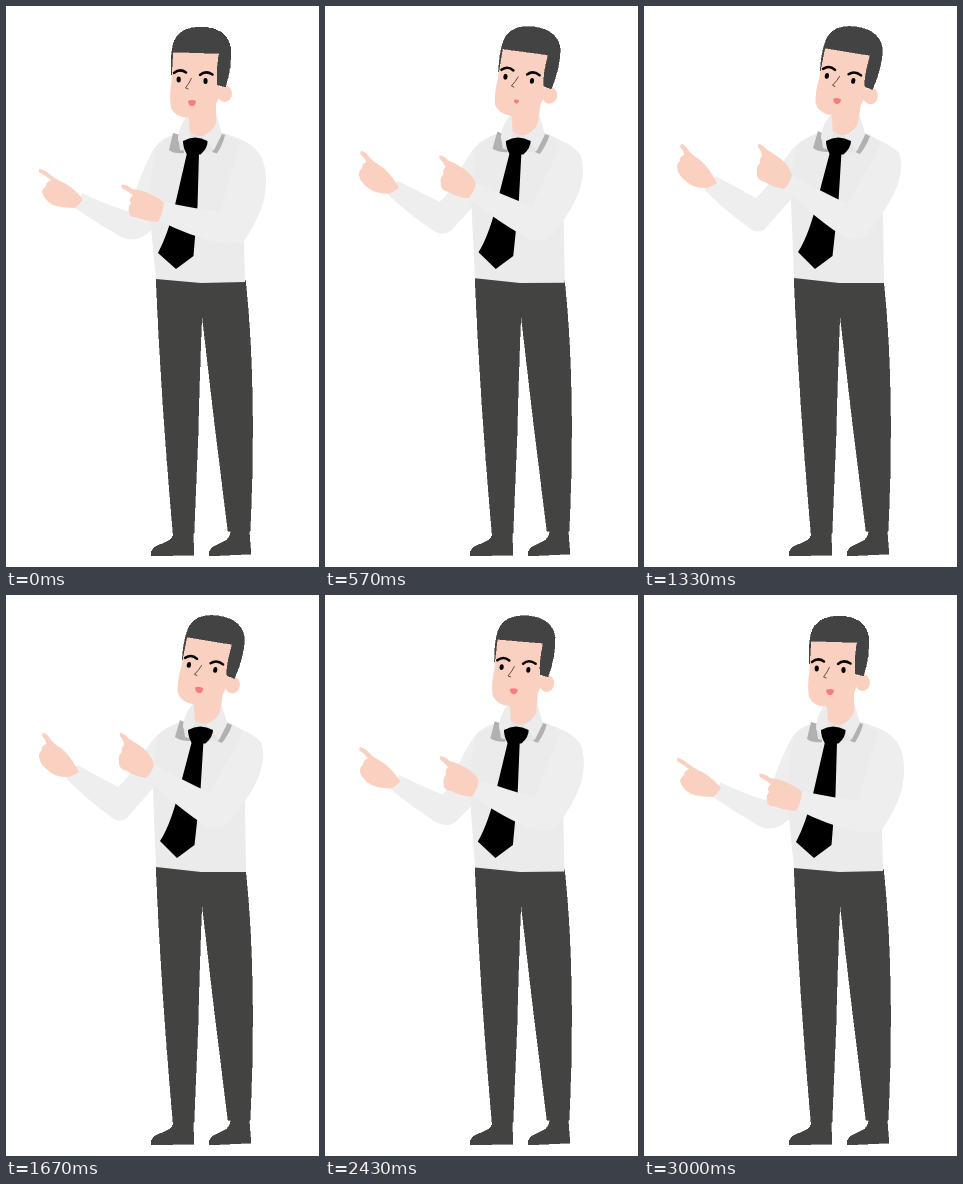
An HTML page that plays this animation: 313 by 561 pixels, repeating every 3030 ms.

```html
<!DOCTYPE html>
<html lang="en">
<head>
<meta charset="utf-8">
<title>Pointing man</title>
<style>
  html, body { margin: 0; width: 100%; height: 100%; overflow: hidden; background: #fff; }
  svg { display: block; width: 100vw; height: 100vh; }
  .crisp { shape-rendering: crispEdges; stroke-width: .6; }
</style>
</head>
<body>
<svg viewBox="0 0 313 561">
  <g class="crisp" fill="#434341" stroke="#434341">
    <path d="M150 271 L239.500 275 Q246 335 246.500 410 Q247 470 244 525 L222 525 Q208 415 196 308 Q194 350 192 430 L188 527 L167 527 Q155 390 150 271Z"/>
    <path d="M168 524 H187 L188 549 L145 550 Q144 545 149 541 L160 536 Q167 534 168 524Z"/>
    <path d="M225 523 H243 L245 548 L203 550 Q202 545 207 541 L217 536 Q225 533 225 523Z"/>
  </g>

  <path id="farArm" fill="#eee"/>
  <path id="farHand" fill="#fad1c1"/>
  <path id="torso" fill="#ebebeb"/>
  <path id="collarShade" fill="#b1b1b1"/>
  <path id="collar" fill="#e5e5e5"/>

  <g id="head">
    <g fill="#fad1c1">
      <path d="M183 105 V125 Q190 131 196 130 Q205 127 210 117 V92Z"/>
      <ellipse cx="218.500" cy="87.500" rx="7.500" ry="8.500"/>
      <path d="M166 42 H214 L213 80 Q214 98 205 103 Q193 111 182 112 Q169 111 165 102 Q163 90 165.500 76Z"/>
    </g>
    <path class="crisp" fill="#434343" stroke="#434343" d="M165.500 69 Q164 52 167 39 Q171 21 196 21 Q221 22 224.500 41 Q226 60 219.500 81 L211.500 79 Q210 66 213 47.500 L167 46Z"/>
    <g fill="none" stroke="#050505" stroke-linecap="round" stroke-width="2.500">
      <path d="M168 67 Q174 62 180 66.500"/>
      <path d="M194 69 Q199.500 64 206.500 68.500"/>
    </g>
    <g id="openEyes">
      <ellipse cx="172.700" cy="73.500" rx="2.100" ry="2.900"/>
      <ellipse cx="199.500" cy="75" rx="2.100" ry="2.900"/>
    </g>
    <path id="shutEyes" fill="none" stroke="#b98f84" stroke-width=".8" d="M169 76.500 H174 M197 78 H202"/>
    <path fill="none" stroke="#51423f" stroke-width=".9" d="M185.500 72 Q183.500 77 179.500 82 L182.500 83"/>
    <path id="mouth" fill="#f37d80" d="M182 95 Q186 93 190 95 Q189.500 100 186 100 Q182.500 100 182 95Z"/>
  </g>

  <path id="flaps" fill="#ececec"/>
  <path id="tie" fill="#000"/>
  <path id="knot" fill="#000"/>
  <path id="nearArm" fill="#eee"/>
  <path id="nearHand" fill="#fad1c1"/>
</svg>
<script>
const LOOP = 3030;
const part = id => document.getElementById(id);

// Each part has a low and a raised pose with matching path commands.
const armPoses = {
  farArm: [
    "M168 129 Q152 132 144 150 Q133 172 127 194 Q125 204 121 205 Q98 198 76 187 Q74 196 69 202 Q91 217 115 231 Q128 237 139 229 L148 222 L170 200Z",
    "M172 128 Q155 134 146 146 Q132 165 125 177 Q118 187 112 192 Q90 180 71 170 Q67 178 60 183 Q80 204 104 221 Q113 229 121 223 L147 193 L170 190Z"],
  farHand: [
    "M33 163 Q37 163 42 167 Q48 172 54 175 Q66 180 77 193 Q72 200 69 202 Q55 202 47 199 Q38 194 36 186 Q37 182 40 180 Q40 176 45 174 Q40 170 33 166Z",
    "M37 138 Q40 138 43 142 Q47 149 55 153 Q64 160 73 177 Q66 182 61 182 Q50 182 44 177 Q34 170 33 162 Q33 157 36 155 Q35 151 40 149 Q40 145 36 141Z"],
  nearArm: [
    "M222 129 Q247 135 256 152 Q263 170 258 194 Q252 215 238 235 Q232 238 215 237 Q185 231 152 214 Q156 208 158 196 Q185 202 215 206 Q220 180 235 137Z",
    "M226 131 Q246 137 255 147 Q260 158 254 178 Q246 200 222 229 Q212 236 200 231 Q175 215 140 183 Q146 178 148 169 Q172 183 204 198 Q218 172 238 137Z"],
  nearHand: [
    "M115 179 Q120 178 126 183 Q137 184 146 189 Q153 192 158 197 Q157 208 152 216 Q138 215 130 211 Q123 212 123 205 Q122 200 125 197 Q122 193 127 189 Q121 185 116 182Z",
    "M114 138 Q118 138 122 143 Q130 148 137 153 Q145 160 148 169 Q146 178 140 183 Q128 181 121 176 Q112 174 113 166 Q112 160 116 157 Q115 153 118 150 Q117 144 114 141Z"]
};
const bodyPoses = {
  torso: [
    "M166 130 Q158 134 150 141 Q142 175 145 222 L150 273 L195 277 L239 276 L238 235 L238 135 L218 127 L196 125Z",
    "M172 128 Q160 132 152 141 Q147 165 147 196 L150 272 L195 277 L240 277 L239 210 L240 137 L224 128 L200 126Z"],
  collarShade: [
    "M167 127 L163 144 Q168 148 178 147 L178 130Z M213 127 L206 146 L211 147.5 Q217 138 219 129Z",
    "M174 125 L169 142 Q174 146 184 146 L184 130Z M219 127 L211 146 L216 148 Q223 139 226 130Z"],
  collar: [
    "M181 110 Q174 119 172 131 L174 144 L190 147 L207 145 L215 128 L209 107Z",
    "M187 109 Q179 118 177 130 L179 142 L195 147 L212 146 L221 128 L215 108Z"],
  flaps: [
    "M181 110 Q174 119 172 134 L178 141 L184 131 L183 113Z M210 107 L216 128 L208 144 L200 134 L197 131 Q207 126 210 117Z",
    "M187 109 Q179 118 177 132 L183 140 L189 130 L188 113Z M215 108 L221 129 L213 145 L205 134 L200 130 Q210 126 214 117Z"],
  tie: [
    "M181 147 L193 147 L191.5 200 L187.5 250 L170 263 L152 247 Q162 228 169 199Z",
    "M186 146 L197.5 146 L194.5 195 L188.5 250 L171 263 L154 246 Q166 228 176 184Z"],
  knot: [
    "M177 135 Q189 128 201.5 135 Q202 142 194.5 148.5 L181 148.5 Q177 142 177 135Z",
    "M182 135 Q194 128 207 135 Q207 142 199.5 148.5 L186 148.5 Q182 142 182 135Z"]
};

const armKeys = [[0, 0], [330, .5], [930, .95], [1300, 1], [1670, 1], [2030, .74], [2430, .43], [3000, 0], [LOOP, 0]];
const bodyKeys = [[0, 0], [330, .54], [930, .99], [1300, 1], [1670, 1], [2030, .87], [2430, .39], [3000, 0], [LOOP, 0]];
const mouthKeys = [[0, 1], [330, .6], [930, .85], [1670, 1.05], [2030, 1], [2430, 1], [LOOP, 1]];

// Smooth curve through the keys, flat at its turning points.
function track(keys, t) {
  const slope = i => {
    if (i === 0 || i === keys.length - 1) return 0;
    const [a, b, c] = keys.slice(i - 1, i + 2);
    return (b[1] - a[1]) * (c[1] - b[1]) > 0 ? (c[1] - a[1]) / (c[0] - a[0]) : 0;
  };
  const i = keys.findIndex((key, n) => n + 1 === keys.length - 1 || t < keys[n + 1][0]);
  const [t0, v0] = keys[i], [t1, v1] = keys[i + 1];
  const d = t1 - t0, u = (t - t0) / d, w = 1 - u;
  return w * w * (1 + 2 * u) * v0 + u * u * (3 - 2 * u) * v1
    + d * u * w * (w * slope(i) - u * slope(i + 1));
}

function blend([low, high], k) {
  const ends = high.match(/[\d.]+/g);
  let i = 0;
  return low.replace(/[\d.]+/g, n => (+n + (ends[i++] - n) * k).toFixed(2));
}

function pose(shapes, k) {
  for (const id in shapes) part(id).setAttribute("d", blend(shapes[id], k));
}

function draw(t) {
  const lean = track(bodyKeys, t);
  pose(armPoses, track(armKeys, t));
  pose(bodyPoses, lean);
  part("head").setAttribute("transform",
    `translate(${7 * lean} ${-2 * lean}) rotate(${7.5 * lean} 186 97)`);

  const size = track(mouthKeys, t);
  part("mouth").setAttribute("transform", `translate(186 97) scale(${size}) translate(-186 -97)`);

  const lid = Math.min(1, Math.abs(t - 2030) / 110);
  const openness = Math.max(0, (lid - .3) / .7);
  part("openEyes").setAttribute("transform", `translate(0 ${75 * (1 - openness)}) scale(1 ${openness})`);
  part("shutEyes").setAttribute("opacity", openness < .15 ? 1 : 0);
}

const start = performance.now();
function tick() {
  draw((performance.now() - start) % LOOP);
  requestAnimationFrame(tick);
}
tick();
</script>
</body>
</html>
```
